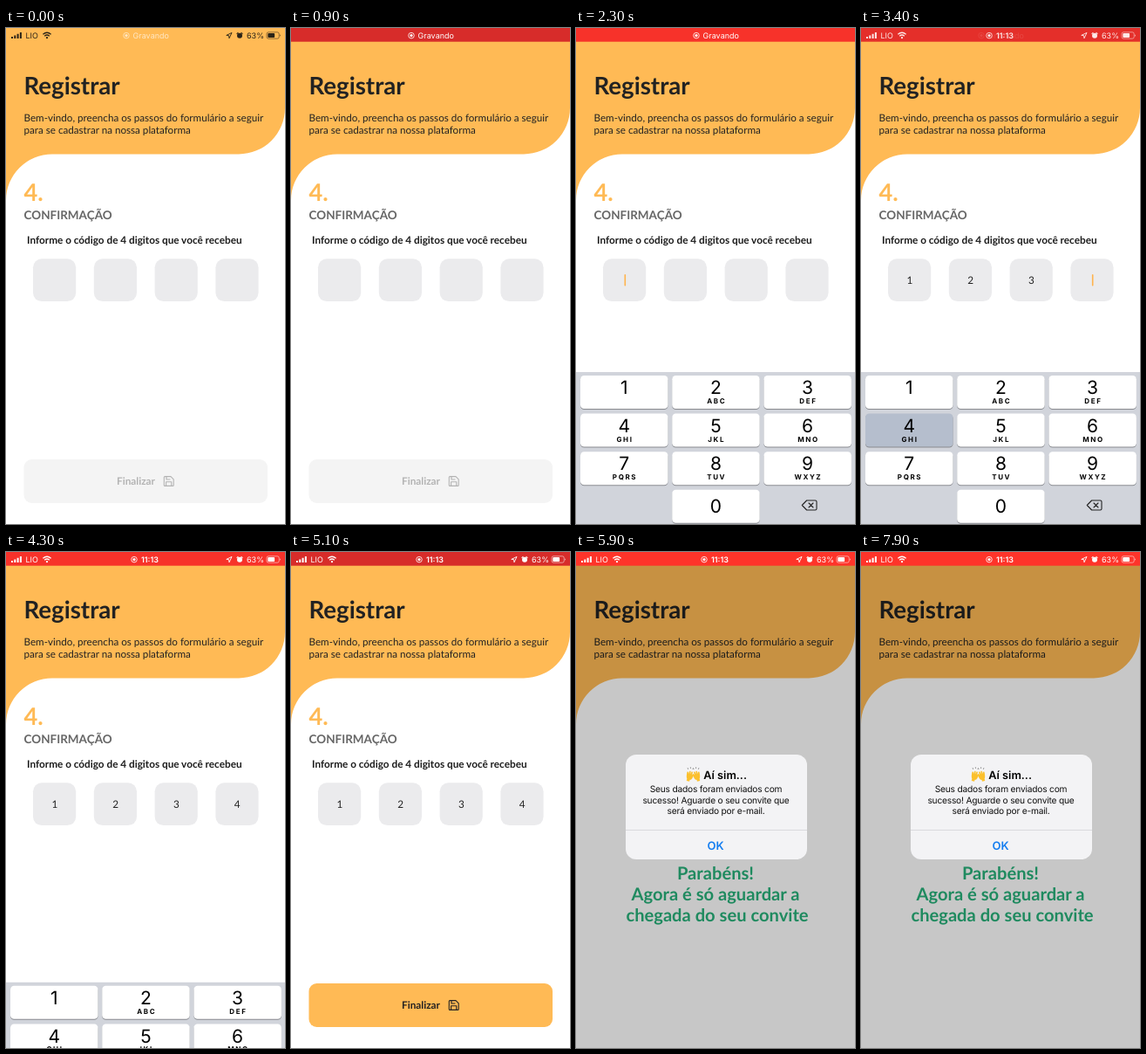
An HTML page that plays this animation: 320 px wide and 568 px high, repeating every 8 s.

```html
<!DOCTYPE html>
<html lang="pt-BR">
<head>
<meta charset="utf-8">
<title>Registrar</title>
<style>
  html, body { margin: 0; width: 100%; height: 100%; overflow: hidden; background: #fff; }
  svg { display: block; width: 320px; height: 568px; }
  text { font-family: Lato, "Open Sans", sans-serif; text-rendering: geometricPrecision; }
  .ui text { font-family: Inter, Roboto, sans-serif; }
  .mid { text-anchor: middle; }
  .bold { font-weight: 700; }
  .semi { font-weight: 600; }
</style>
</head>
<body>
<svg viewBox="0 0 320 568" xmlns="http://www.w3.org/2000/svg">
  <rect width="320" height="568" fill="#fff"/>
  <path fill="#ffba55" d="M0 0H320V91.4A53 53 0 0 1 267 144.4H53A53 53 0 0 0 0 197.4Z"/>
  <g fill="#222">
    <text class="bold" x="20.4" y="76" font-size="27.7">Registrar</text>
    <g font-size="11.65">
      <text x="20.5" y="107">Bem-vindo, preencha os passos do formulário a seguir</text>
      <text x="20.5" y="121">para se cadastrar na nossa plataforma</text>
    </g>
  </g>

  <g id="form">
    <text class="bold" x="20.5" y="197.8" font-size="27.3" fill="#ffba55">4.</text>
    <text class="bold" x="20.5" y="218.5" font-size="13.5" fill="#666">CONFIRMAÇÃO</text>
    <text class="bold" x="24" y="247" font-size="11.77" fill="#1c1c1c">Informe o código de 4 digitos que você recebeu</text>
    <g id="fields"></g>
    <rect id="caret" y="282" width="1.6" height="13.5" rx=".8" fill="#ffb34d"/>
    <g id="button">
      <rect id="buttonFace" x="20.5" y="494" width="279.5" height="50" rx="9"/>
      <g id="buttonLabel">
        <text class="bold" x="127" y="523" font-size="11.77" fill="currentColor">Finalizar</text>
        <path fill="none" stroke="currentColor" stroke-width="1.1" stroke-linejoin="round"
          d="M182.3 513.6H189L192.2 516.8V523.4Q192.2 524.4 191.2 524.4H182.3Q181.3 524.4 181.3 523.4V514.6Q181.3 513.6 182.3 513.6ZM184 513.8V517H188.4M183.6 524.2V519.8H189.8V524.2"/>
      </g>
    </g>
  </g>

  <g id="done" class="bold mid" font-size="20.15" fill="#28b17a">
    <text x="160" y="375">Parabéns!</text>
    <text x="160" y="399">Agora é só aguardar a</text>
    <text x="162" y="423">chegada do seu convite</text>
  </g>

  <g id="keyboard" class="ui mid">
    <rect y="394" width="320" height="180" fill="#d1d4db"/>
    <g id="keys"></g>
    <path fill="none" stroke="#222" stroke-width="1.1" stroke-linejoin="round" stroke-linecap="round"
      d="M264.6 541H274.5Q276 541 276 542.5V550.5Q276 552 274.5 552H264.6L259.3 546.5ZM267 544L272 549M272 544L267 549"/>
  </g>

  <rect id="dim" width="320" height="568" fill="#000"/>

  <g id="alert" class="ui">
    <rect x="57" y="232" width="208" height="120" rx="12" fill="#f3f3f5"/>
    <g id="hands" fill="#fbc02d"></g>
    <text class="semi" x="146.3" y="260" font-size="12.7">Aí sim...</text>
    <g class="mid" font-size="10.2" letter-spacing="-.2" fill="#111">
      <text x="160.5" y="275.3">Seus dados foram enviados com</text>
      <text x="160.5" y="287.7">sucesso! Aguarde o seu convite que</text>
      <text x="160.5" y="300">será enviado por e-mail.</text>
    </g>
    <path d="M57 318.5H265" stroke="#d3d3d7" stroke-width=".8"/>
    <text class="semi mid" x="160" y="341" font-size="13" fill="#137df0">OK</text>
  </g>

  <g id="status" class="ui" font-size="9">
    <rect id="bar" width="320" height="15.7"/>
    <g id="sides" fill="currentColor">
      <path d="M6 10h2v2h-2zM9.3 8.6h2v3.4h-2zM12.6 6.8h2v5.2h-2zM15.9 5h2v7h-2z"/>
      <text x="22.5" y="11.7">LIO</text>
      <path fill="none" stroke="currentColor" stroke-width="1.3" d="M42.4 7.2Q47 3.2 51.6 7.2M44.2 9.3Q47 6.8 49.8 9.3"/>
      <circle cx="47" cy="11.2" r="1.1"/>
      <path fill="none" stroke="currentColor" stroke-width=".9" stroke-linejoin="round" d="M252.8 8.4L259 5.4L256 11.8L255.6 8.7Z"/>
      <circle cx="268" cy="8.8" r="3"/>
      <path fill="none" stroke="currentColor" stroke-width="1.1" d="M264.6 6.8L266.4 5.2M271.4 6.8L269.6 5.2"/>
      <text x="276" y="11.7">63%</text>
      <rect x="299" y="4.8" width="14.2" height="7.4" rx="2" fill="none" stroke="currentColor" stroke-width=".8" opacity=".65"/>
      <rect x="300.3" y="6.1" width="7.8" height="4.8" rx="1"/>
      <path d="M314.3 7.2q1.3 1.3 0 2.6z"/>
    </g>
    <g id="recording" fill="#fff">
      <circle cx="138" cy="8.6" r="3.3" fill="none" stroke="#fff" stroke-width=".8"/>
      <circle cx="138" cy="8.6" r="1.6"/>
      <text x="145.6" y="11.8">Gravando</text>
    </g>
    <g id="clock" fill="#fff">
      <circle cx="147" cy="8.6" r="3.3" fill="none" stroke="#fff" stroke-width=".8"/>
      <circle cx="147" cy="8.6" r="1.6"/>
      <text class="semi" x="155" y="11.8">11:13</text>
    </g>
  </g>
</svg>

<script>
const LOOP = 8000, STEP = 100;
const TYPED = [2600, 2900, 3200, 3500];
const FOCUS = 1850, KEYS_IN = 1800, KEYS_OUT = 4200, SLIDE = 410;
const PRESS = 5200, SUBMIT = 5400, ALERT = 5450;

const $ = id => document.getElementById(id);
const ramp = (t, start, length) => Math.min(1, Math.max(0, (t - start) / length));
const easeOut = u => 1 - (1 - u) ** 3;
const show = (id, opacity) => {
  $(id).setAttribute('opacity', opacity);
  $(id).style.display = opacity > 0 ? '' : 'none';
};
const mix = (a, b, u) => `rgb(${a.map((v, i) => Math.round(v + (b[i] - v) * u))})`;

const fieldX = i => 31 + i * 69.8;
$('fields').innerHTML = TYPED.map((_, i) => `
  <rect x="${fieldX(i)}" y="264.3" width="49.2" height="48.8" rx="10" fill="#ebebed"/>
  <text class="mid digit" x="${fieldX(i) + 24.8}" y="293" font-size="11.77" fill="#222">${i + 1}</text>`).join('');
const digits = [...document.querySelectorAll('.digit')];

const letters = ['', 'ABC', 'DEF', 'GHI', 'JKL', 'MNO', 'PQRS', 'TUV', 'WXYZ'];
function key(label, caption, col, row) {
  const x = 5 + col * 105.2, y = 398 + row * 43.6, cx = x + 50.2;
  return `<rect x="${x}" y="${y + 1}" width="100.5" height="38" rx="4.3" fill="#898b90"/>
    <rect class="face" x="${x}" y="${y}" width="100.5" height="38" rx="4.3" fill="#fff"/>
    <text x="${cx}" y="${y + (label ? 21.2 : 26)}" font-size="21">${label}</text>
    <text class="bold" x="${cx + .8}" y="${y + 32}" font-size="8" letter-spacing="1.6">${caption}</text>`;
}
$('keys').innerHTML = letters.map((s, i) => key(i + 1, s, i % 3, Math.floor(i / 3))).join('') +
  key(0, '', 1, 3);
const faces = [...document.querySelectorAll('.face')];

const hand = `<path transform="rotate(14 130 256)" d="M126.6 252.5q1-1 1.6.3l.5 1.8.3-3.4q.9-1 1.5 0l.2 3 .8-3.2q1-.7 1.4.3l-.1 3.6 1-1.6q1-.6 1.2.5l-1 4.6q-.6 2-2.3 2.2v2h-3.4v-2.4q-1.6-1.6-1.7-7.7z"/>
  <path d="M128.6 248.8l-.5-1.6M131.4 248v-1.6M134 248.8l.4-1.2" stroke="#777" stroke-width=".8"/>`;
$('hands').innerHTML = hand + `<g transform="translate(269 0) scale(-1 1)">${hand}</g>`;

function drawStatus(t) {
  const red = ramp(t, 0, 400), timeIn = ramp(t, 3000, 450);
  const pulse = .5 + .5 * Math.cos((t - 2000) / 1000 * Math.PI);
  $('bar').setAttribute('fill', mix([214, 44, 42], [255, 52, 42], pulse));
  show('bar', red);
  $('sides').style.color = t < 1000 ? '#2b2418' : '#fff';
  show('sides', t < 1000 ? 1 - red : timeIn);
  show('recording', (.65 + .35 * red) * (1 - timeIn));
  show('clock', timeIn);
}

function drawForm(t) {
  const count = TYPED.filter(at => t >= at).length;
  digits.forEach((d, i) => d.setAttribute('opacity', i < count ? 1 : 0));
  $('caret').setAttribute('x', fieldX(Math.min(count, 3)) + 24.5);
  show('caret', t >= FOCUS && count < 4 ? 1 : 0);

  const ready = count === 4;
  $('buttonFace').setAttribute('fill', ready ? '#ffba55' : '#f4f4f4');
  $('buttonLabel').style.color = ready ? '#222' : '#b3b3b3';
  $('button').setAttribute('opacity', 1 - .6 * ramp(t, PRESS, 150));
  show('form', t < SUBMIT ? 1 : 0);
  show('done', t < SUBMIT ? 0 : 1);
}

function drawKeyboard(t) {
  const up = easeOut(ramp(t, KEYS_IN, SLIDE)) - easeOut(ramp(t, KEYS_OUT, SLIDE));
  $('keyboard').setAttribute('transform', `translate(0 ${174 * (1 - up)})`);
  show('keyboard', up > 0 ? 1 : 0);
  faces.forEach((face, i) => {
    const pressed = i < 4 && t >= TYPED[i] - 100 && t < TYPED[i] + 50;
    face.setAttribute('fill', pressed ? '#b5becd' : '#fff');
  });
}

function drawAlert(t) {
  const shown = easeOut(ramp(t, ALERT, 350));
  const scale = 1.15 - .15 * shown;
  show('dim', .22 * shown);
  show('alert', shown);
  $('alert').setAttribute('transform', `translate(161 292) scale(${scale}) translate(-161 -292)`);
}

function draw(now) {
  const t = Math.floor(now % LOOP / STEP) * STEP;
  drawStatus(t);
  drawForm(t);
  drawKeyboard(t);
  drawAlert(t);
}

const start = performance.now();
function tick() {
  draw(performance.now() - start);
  requestAnimationFrame(tick);
}
tick();
</script>
</body>
</html>
```
